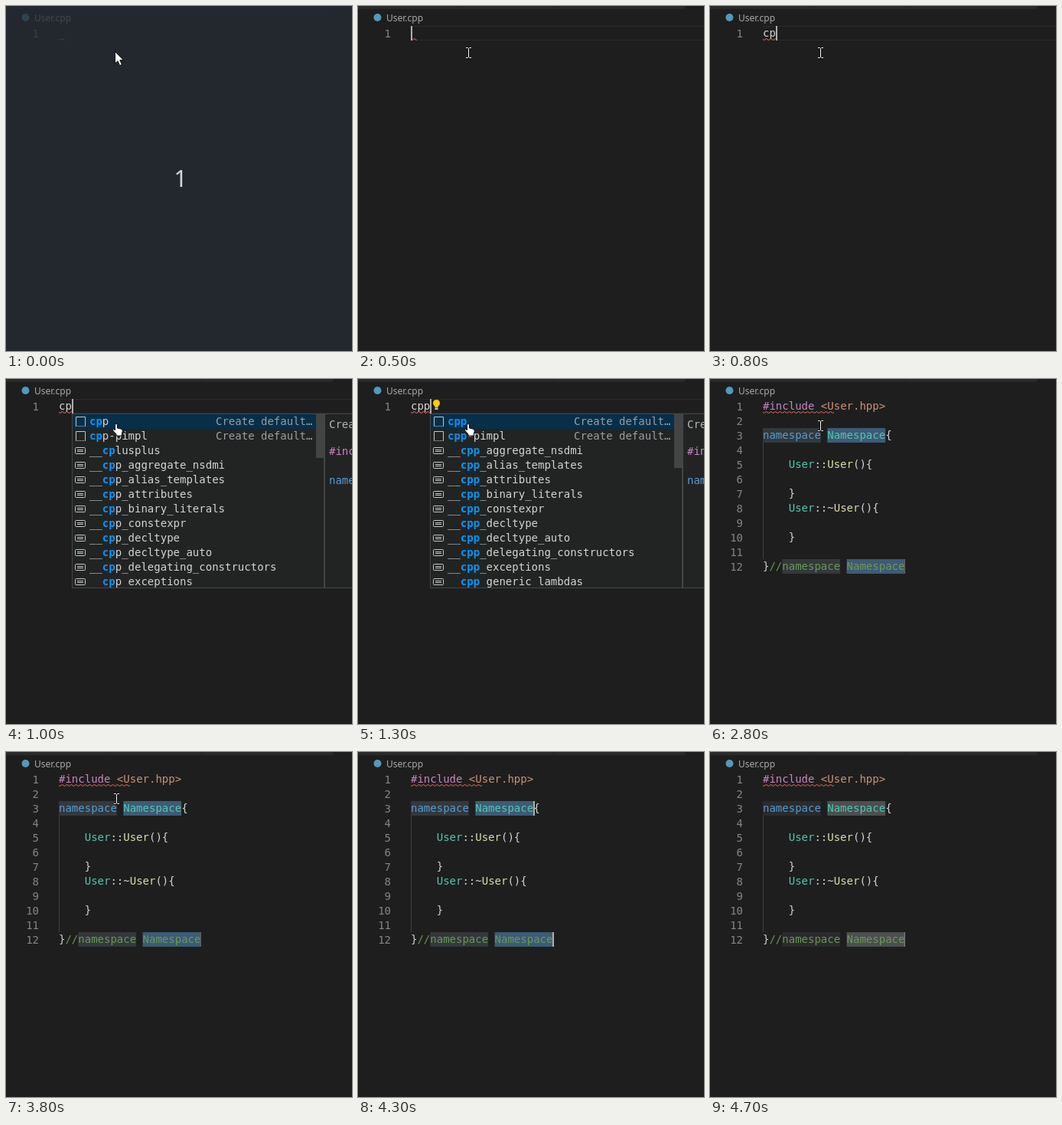
Write an HTML page that moves like this. It is 452x450 px and loops after 4800 ms.

```html
<!DOCTYPE html>
<html lang="en">
<head>
<meta charset="utf-8">
<title>Snippet completion</title>
<style>
html, body { margin: 0; width: 100%; height: 100%; overflow: hidden; background: #1e1e1e; }
svg { display: block; width: 452px; height: 450px; }
text { white-space: pre; font: 14px "DejaVu Sans Mono", monospace; }
.bold { font-weight: bold; }
.ui { font: 12px "Noto Sans", sans-serif; }
.count { font: 30px "Noto Sans", sans-serif; }
</style>
</head>
<body>
<svg id="stage" viewBox="0 0 452 450" xmlns="http://www.w3.org/2000/svg"></svg>
<script>
const LOOP = 4800, CH = 8.428, ROW = 19, LEFT = 69, TOP = 26;
const C = {
  plain: '#d4d4d4', key: '#569cd6', type: '#4ec9b0', fn: '#dcdcaa', pre: '#c586c0',
  str: '#ce9178', note: '#6a9955', num: '#858585', caret: '#aeafad', hit: '#0097fb'
};

// Each step changes only the listed properties.
const steps = [
  [0, { typed: '', squiggle: 1, caret: false, popup: '', bulb: false, code: false, marks: '',
        mouse: ['arrow', 142, 59], intro: true }],
  [500, { intro: false, caret: true, mouse: ['beam', 144, 61] }],
  [700, { typed: 'c' }],
  [800, { typed: 'cp', squiggle: 2 }],
  [900, { popup: 'cp' }],
  [1000, { mouse: ['hand', 139, 58] }],
  [1100, { typed: 'cpp', popup: 'cpp' }],
  [1300, { bulb: true, squiggle: 3 }],
  [1600, { caret: false }],
  [2100, { caret: true }],
  [2200, { mouse: ['beam', 144, 61] }],
  [2300, { popup: '', code: true, marks: 'selected' }],
  [2500, { squiggle: 11 }],
  [2800, { bulb: false, marks: 'matched', caret: false }],
  [3300, { caret: true }],
  [3800, { caret: false }],
  [4100, { mouse: ['beam', 133, 41] }],
  [4200, { mouse: ['arrow', 112, 5] }],
  [4300, { mouse: null, caret: true }],
  [4700, { marks: 'blurred', caret: false }]
];

const code = {
  1: [['#include ', C.pre], ['<User.hpp>', C.str]],
  3: [['namespace', C.key], [' '], ['Namespace', C.type], ['{']],
  5: [['    '], ['User', C.type], ['::'], ['User', C.fn], ['(){']],
  7: [['    }']],
  8: [['    '], ['User', C.type], ['::~'], ['User', C.fn], ['(){']],
  10: [['    }']],
  12: [['}'], ['//namespace Namespace', C.note]]
};

// Background of the chosen word, of its lower case match, and of the final tab stop.
const markColors = {
  selected: ['#264f78', 'none', '#5f5f5f'],
  matched: ['#3d5b75', '#33383b', '#5f5f5f'],
  blurred: ['#4b4f50', '#292b2c', '#777777']
};

const features = ['aggregate_nsdmi', 'alias_templates', 'attributes', 'binary_literals', 'constexpr',
  'decltype', 'decltype_auto', 'delegating_constructors', 'exceptions', 'generic_lambdas']
  .map(s => '__cpp_' + s);
const lists = {
  cp: ['cpp', 'cpp-pimpl', '__cplusplus', ...features.slice(0, 9)],
  cpp: ['cpp', 'cpp-pimpl', ...features]
};

const esc = s => s.replace(/&/g, '&amp;').replace(/</g, '&lt;').replace(/>/g, '&gt;');
const rect = (x, y, w, h, fill, more = '') =>
  `<rect x="${x}" y="${y}" width="${w}" height="${h}" fill="${fill}" ${more}/>`;
const path = (d, fill, stroke = 'none', more = '') =>
  `<path d="${d}" fill="${fill}" stroke="${stroke}" ${more}/>`;
const text = (x, y, s, fill = C.plain, cls = '', more = '') =>
  `<text x="${x}" y="${y}" fill="${fill}" class="${cls}" ${more}>${esc(s)}</text>`;
const col = n => LEFT + n * CH;
const lineTop = n => TOP + (n - 1) * ROW;

function tokens(x, y, parts) {
  let out = '';
  for (const [s, fill, cls] of parts) {
    if (s.trim()) out += text(x, y, s, fill, cls);
    x += s.length * CH;
  }
  return out;
}

function squiggle(chars) {
  const end = Math.round(col(chars));
  let d = `M${LEFT} 43.2L70.5 44.5`;
  for (let x = 70.5; x < end; x += 6) d += `L${x + 3} 42.5L${x + 6} 44.5`;
  return `<svg x="${LEFT}" y="42" width="${end - LEFT}" height="3" viewBox="${LEFT} 42 ${end - LEFT} 3">` +
    path(d, 'none', '#ee735c') + '</svg>';
}

const caret = (column, line) => rect(Math.round(col(column)), lineTop(line), 2, ROW, C.caret);

function bulb() {
  return '<circle cx="102.5" cy="31.5" r="4.5" fill="#ffcc00"/>' +
    rect(100.5, 34, 4, 3, '#ffcc00') + rect(100.5, 37.5, 4, 2.5, '#c5c5c5');
}

function pointer([kind, x, y]) {
  const shapes = {
    arrow: path('M.5 .5V16L4 12.7L6.6 18.6L9.4 17.4L6.8 11.6H11.4Z', '#fff', '#111'),
    beam: path('M-3 -6.5H-.5L.5 -5.5L1.5 -6.5H4M.5 -5.5V5.5M-3 6.5H-.5L.5 5.5L1.5 6.5H4',
      'none', '#111', 'stroke-width="3"') +
      path('M-3 -6.5H-.5L.5 -5.5L1.5 -6.5H4M.5 -5.5V5.5M-3 6.5H-.5L.5 5.5L1.5 6.5H4', 'none', '#fff'),
    hand: path('M3.5 9V2Q3.5 .5 5 .5T6.5 2V6L11 7Q13.5 7.6 13.3 10L12.3 13.5V16H5V14L1 9.6' +
      'Q0 8 1.5 7.5Q2.5 7.4 3.5 9Z', '#fff', '#111')
  };
  return `<g transform="translate(${x} ${y})">${shapes[kind]}</g>`;
}

function icon(x, y, isSnippet) {
  return isSnippet
    ? path(`M${x + 1.5} ${y + 15}V${y + 3.5}H${x + 13.5}V${y + 15}`, 'none', '#c5c5c5') +
      path(`M${x + 1} ${y + 15.5}H${x + 14}`, 'none', '#c5c5c5', 'stroke-dasharray="1 1"')
    : `<rect x="${x + .5}" y="${y + 5.5}" width="13" height="8" rx="1" fill="none" stroke="#c5c5c5"/>` +
      path(`M${x + 3} ${y + 8.5}H${x + 11}M${x + 3} ${y + 10.5}H${x + 11}`, 'none', '#c5c5c5');
}

function popup(match) {
  const x = Math.round(col(match.length)), bg = '#222424', edge = '#454545';
  let out = rect(x + .5, 45.5, 329, 227, bg, `stroke="${edge}"`);
  out += rect(x + 1, 46, 318, ROW, '#062f4a');
  let rows = '';
  lists[match].forEach((name, i) => {
    const y = 46 + i * ROW, at = name.indexOf(match), isSnippet = i < 2;
    rows += icon(x + 4, y, isSnippet) + tokens(x + 23, y + 14, [
      [name.slice(0, at)], [match, C.hit, 'bold'], [name.slice(at + match.length)]
    ]);
    if (isSnippet) rows += text(x + 188, y + 14, 'Create default…', '#9a9fa2');
  });
  out += `<svg x="0" y="0" width="452" height="272" viewBox="0 0 452 272">${rows}</svg>`;
  out += rect(x + 319, 46, 10, match === 'cp' ? 57 : 70, '#434545');
  const side = x + 330;
  return out + rect(side + .5, 45.5, 200, 227, bg, `stroke="${edge}"`) +
    text(side + 6, 64, 'Create', '#b5b5b5') +
    text(side + 6, 99, '#include', C.pre) +
    text(side + 6, 137, 'namespace', C.key);
}

function snippet(marks) {
  const [word, match, stop] = markColors[marks];
  const mark = (column, line, fill) => rect(col(column), lineTop(line), 9 * CH, ROW, fill);
  let out = mark(0, 3, match) + mark(10, 3, word) + mark(3, 12, match) + mark(13, 12, word);
  out += rect(LEFT, lineTop(4), 1, 8 * ROW, '#404040');
  for (const n in code) out += tokens(LEFT, lineTop(n) + 14, code[n]);
  return out + rect(253.5, lineTop(12), 1.5, ROW, stop);
}

function draw(s) {
  let out = rect(0, 0, 452, 450, '#1e1e1e') + rect(0, 0, 427, 4, '#2a2a2a');
  out += rect(135, 0, 1, 4, '#222') + rect(255, 0, 1, 4, '#222');
  out += '<circle cx="25.5" cy="15" r="5" fill="#519aba"/>' + text(37, 20, 'User.cpp', '#a9a9a9', 'ui');

  for (let n = 1; n <= (s.code ? 12 : 1); n++)
    out += text(43, lineTop(n) + 15, String(n), C.num, '', 'text-anchor="end"');

  if (s.code) {
    out += snippet(s.marks);
  } else {
    out += rect(LEFT, 26, 383, 1, '#2a2a2a') + rect(LEFT, 44, 383, 1, '#2a2a2a');
    out += text(LEFT, 40, s.typed);
  }
  out += squiggle(s.squiggle);
  if (s.caret) out += s.code ? caret(19, 3) + caret(21.9, 12) : caret(s.typed.length, 1);
  if (s.bulb) out += bulb();
  if (s.popup) out += popup(s.popup);
  if (s.intro) out += rect(0, 0, 452, 450, '#252a32', 'opacity=".78"') + text(219.5, 236, '1', '#d6d8d6', 'count');
  if (s.mouse) out += pointer(s.mouse);
  return out;
}

let state = {};
const views = steps.map(([, change]) => draw(state = { ...state, ...change }));
const stage = document.getElementById('stage');
const start = performance.now();
let shown = -1;

function tick(now) {
  const t = Math.max(0, now - start) % LOOP;
  const i = steps.filter(([at]) => at <= t).length - 1;
  if (i !== shown) stage.innerHTML = views[shown = i];
  requestAnimationFrame(tick);
}
tick(start);
</script>
</body>
</html>
```
